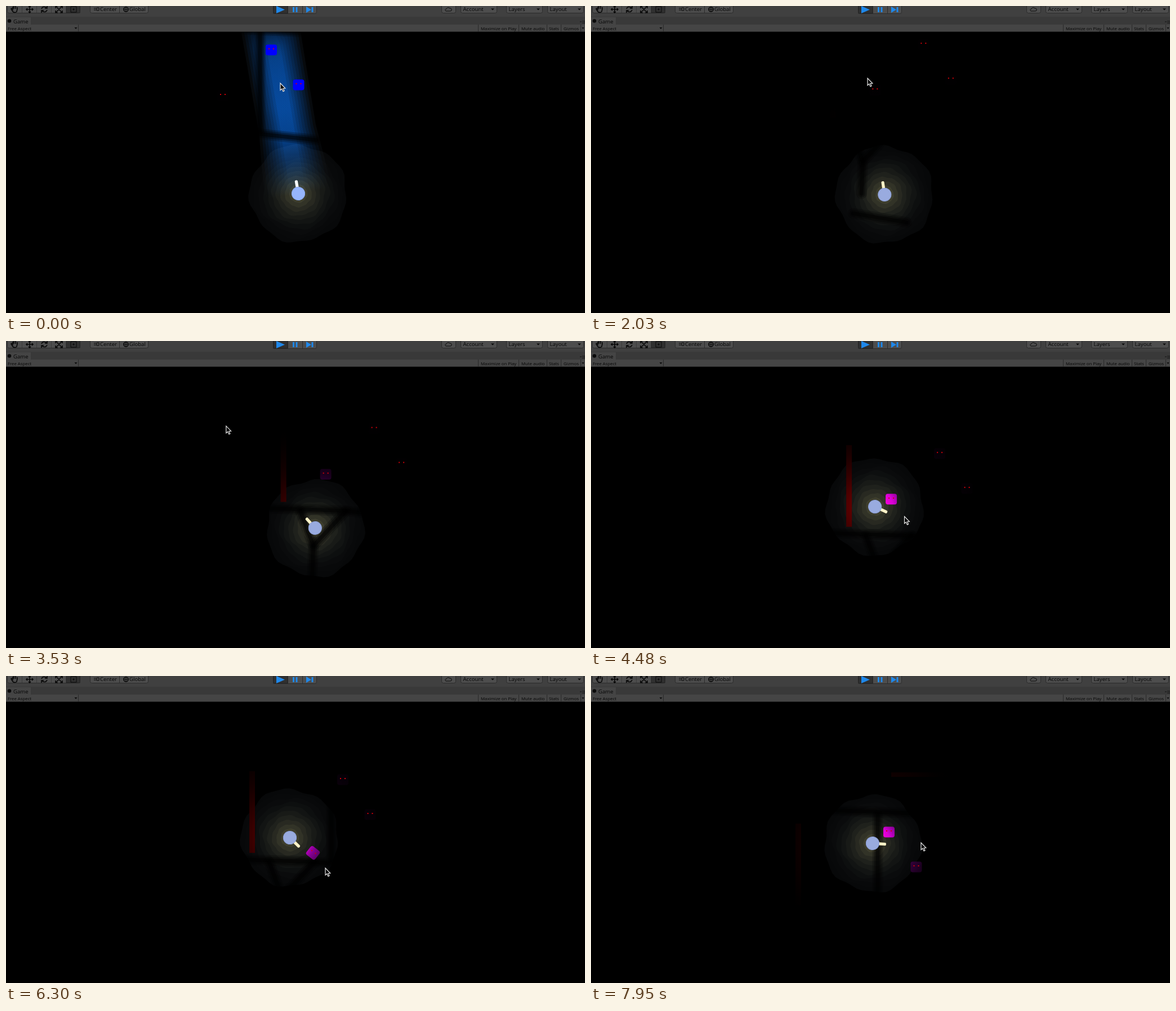
Animation, 1028 px wide and 545 px high, one loop 8 s. Source, as an HTML page with a canvas:

```html
<!DOCTYPE html>
<html lang="en">
<head>
<meta charset="utf-8">
<title>Flashlight game</title>
<style>
  html, body { margin: 0; width: 100%; height: 100%; overflow: hidden; background: #000; }
  canvas, svg { position: absolute; left: 0; top: 0; display: block; }
  text { font: 9.6px "Open Sans", "Noto Sans", sans-serif; fill: #060606; }
  .small text { font-size: 7.8px; }
  .btn { fill: #4d4d4d; stroke: #2b2b2b; }
  .on { fill: #303030; stroke: #222; }
  .ico { fill: none; stroke: #080808; stroke-width: 1.6; }
  .thin { stroke-width: 1; }
  .blue { fill: #1f88ea; }
</style>
</head>
<body>
<canvas id="stage" width="1028" height="545"></canvas>
<svg width="1028" height="46" viewBox="0 0 1028 46">
  <rect width="1028" height="46" fill="#404040"/>
  <rect y="19" width="1028" height="14" fill="#393939"/>
  <rect y="20" width="44" height="13" fill="#444"/>
  <rect y="33" width="1028" height="13" fill="#454545"/>
  <path d="M0 45.5H1028" stroke="#2a2a2a"/>
  <rect class="btn" x="2.5" y="-6.5" width="129" height="19" rx="3"/>
  <rect class="on" x="107" y="-6" width="24" height="18"/>
  <path d="M28.5 0V12M54.5 0V12M80.5 0V12M106.5 0V12" stroke="#3a3a3a"/>
  <g class="ico">
    <path d="M12 10L9 5Q10 3 12 6V1M14 5V0M17 5V0M20 6V2M12 10Q16 13 19 10L20 5"/>
    <path d="M36 6H48M42 0V12M38 4L36 6L38 8M46 4L48 6L46 8M40 2L42 0L44 2M40 10L42 12L44 10"/>
    <path d="M63 5Q65 0 70 2L73 4M73 0V4H69M73 7Q71 12 66 10L63 8M63 12V8H67"/>
    <path d="M89 1L99 11M99 1L89 11M88 4V0H92M96 0H100V4M100 8V12H96M92 12H88V8"/>
    <path class="thin" d="M115 1H125V11H115ZM119 5h2v2h-2z"/>
  </g>
  <rect class="btn" x="149.5" y="-6.5" width="103" height="19" rx="3"/>
  <path d="M201.5 0V12" stroke="#2b2b2b"/>
  <path d="M156 4h4M156 7h4M161 3h4v5h-4z" class="ico thin"/>
  <circle cx="213" cy="6" r="4" class="ico"/><path d="M209 6h8M213 2v8" class="ico thin"/>
  <text x="167" y="9">Center</text><text x="219" y="9">Global</text>

  <rect class="btn" x="474.5" y="-6.5" width="77" height="20" rx="3"/>
  <rect class="on" x="475" y="-6" width="25" height="19"/>
  <path d="M500.5 0V13M526.5 0V13" stroke="#2b2b2b"/>
  <path class="blue" d="M480 0L495 6.5L480 13ZM509 2h3v9h-3zM514.5 2h3v9h-3zM533 1L542 6.5L533 12ZM542.5 2h3v9h-3z"/>

  <g id="menus"></g>
  <path d="M781 9q-3-3 1-4q2-4 6-1q4 0 3 4q-1 1-3 1z" class="ico thin"/>
  <circle cx="6" cy="26.5" r="3.3" fill="#0a0a0a"/>
  <text x="13" y="30.5">Game</text>
  <path d="M1019 28h3M1023 27h5M1023 30h5" stroke="#111"/>
  <g class="small">
    <text x="3" y="42.5">Free Aspect</text><text x="843" y="42.5">Maximize on Play</text>
    <text x="915" y="42.5">Mute audio</text><text x="964" y="42.5">Stats</text><text x="990" y="42.5">Gizmos</text>
  </g>
  <path d="M128.5 33V46M838.5 33V46M910.5 33V46M960.5 33V46M985.5 33V46M1020.5 33V46" stroke="#292929"/>
  <path d="M121.5 38h5l-2.5 3zM1022.5 38h4l-2 3z" fill="#0a0a0a"/>
</svg>
<script>
const ctx = document.getElementById('stage').getContext('2d');
const LOOP = 8000, HOLD = 50, TAU = Math.PI * 2;
const { cos, sin, exp, min, max } = Math;

document.getElementById('menus').innerHTML =
  [[773, 25, ''], [807, 64, 'Account'], [888, 64, 'Layers'], [961, 64, 'Layout']].map(([x, w, label]) =>
    `<rect class="btn" x="${x + .5}" y="-6.5" width="${w}" height="19" rx="3"/>` +
    (label && `<text x="${x + 4.5}" y="9">${label}</text><path d="M${x + 54} 4.5h6l-3 3z" fill="#080808"/>`)).join('');

// Key poses: time, hero, mouse, world
const poses = [
  [0, 519, 333, 487, 137, 471, 78],
  [910, 542, 328, 416, 162, 536, 72],
  [2500, 515, 337, 514, 118, 607, 67],
  [2850, 518, 336, 361, 140, 591, 83],
  [3530, 549, 332, 391, 151, 654, 156],
  [4480, 504, 294, 557, 312, 619, 200],
  [6300, 504, 287, 567, 341, 598, 184],
  [7950, 500, 297, 586, 296, 529, 277]
];

// Ground cracks as polylines around the world point
const cracks = [
  [-200, 141, -50, 146, 80, 160],
  [-131, 146, -108, 208, -110, 265],
  [-108, 208, -50, 146],
  [-125, 300, -30, 316],
  [-20, -30, -20, 143],
  [-130, -40, 70, -32]
];

function poseAt(t) {
  const i = max(1, poses.findIndex(p => p[0] > t)), a = poses[i - 1], b = poses[i];
  const k = (t - a[0]) / (b[0] - a[0]), ease = k * k * (3 - 2 * k);
  return a.slice(1).map((v, j) => v + (b[j + 1] - v) * ease);
}

// The lamp flashes for 700 ms and dies away
function lampAt(t) {
  const p = [-250, 2030].map(on => (t - on) / 700).find(v => v >= 0 && v < 1);
  return p === undefined ? 0 : 1 - p ** 3;
}

function trace(pts, ox = 0, oy = 0) {
  ctx.beginPath();
  for (let i = 0; i < pts.length; i += 2) ctx.lineTo(pts[i] + ox, pts[i + 1] + oy);
}

function falloff(x, y, reach, colour) {
  const g = ctx.createRadialGradient(x, y, 0, x, y, reach);
  for (let i = 0; i <= 12; i++) g.addColorStop(i / 12, colour(reach * i / 12));
  return g;
}

function drawBeam(x, y, angle, level) {
  ctx.save();
  ctx.translate(x, y);
  ctx.rotate(angle);
  ctx.globalCompositeOperation = 'lighter';
  for (let i = 0; i < 9; i++) {
    const s = 1 - i * .095, far = 330 - i * 5;
    const rgb = (i ? [0, 8, 19] : [7, 10, 14]).map(v => v * level);
    const g = ctx.createLinearGradient(0, 0, far, 0);
    [0, .45, .9, 1, .95, .85, .2].forEach((a, k) => g.addColorStop(k / 6, `rgba(${rgb},${a})`));
    ctx.fillStyle = g;
    ctx.beginPath();
    for (const side of [-1, 1]) {
      const w = side * s, pts = [[0, 60 * w], [60, 56 * w], [115, 51 * w], [far - 25, 52 * w], [far, 30 * w]];
      (side < 0 ? pts : pts.reverse()).forEach(p => ctx.lineTo(...p));
    }
    ctx.fill();
  }
  ctx.restore();
}

function drawGlow(x, y, wx) {
  ctx.globalCompositeOperation = 'lighten';
  for (let i = 0; i < 10; i++) {
    const q = i / 9, r = 86 - 70 * q;
    ctx.fillStyle = `rgb(${7 + 55 * q ** 2},${8 + 54 * q ** 1.9},${9 + 36 * q ** 1.6})`;
    ctx.beginPath();
    for (let a = 0; a < TAU; a += .1) {
      const d = r * (1 + .025 * sin(5 * a + wx * .05 + i) + .018 * sin(11 * a + i * 2));
      ctx.lineTo(x + d * cos(a), y + d * sin(a));
    }
    ctx.fill();
  }
  ctx.globalCompositeOperation = 'source-over';
}

function drawCracks(x, y) {
  ctx.lineJoin = ctx.lineCap = 'round';
  for (const pts of cracks) {
    trace(pts, x, y);
    for (const [width, alpha] of [[19, .25], [13, .35], [7, .5]]) {
      ctx.lineWidth = width;
      ctx.strokeStyle = `rgba(0,0,0,${alpha})`;
      ctx.stroke();
    }
  }
}

function drawWalls(x, y, light) {
  ctx.fillStyle = light;
  ctx.fillRect(x - 166, y - 15, 10, 145);
  ctx.fillRect(x + 4, y - 106, 122, 8);
}

function drawMonster(x, y, turn, light, blue) {
  const box = new Path2D(), body = new Path2D();
  box.roundRect(-10, -9.5, 20, 19, 4);
  body.addPath(box, new DOMMatrix().translate(x, y).rotate(turn));
  ctx.fillStyle = blue ? `rgb(0,0,${255 * min(1, blue * 2)})` : light;
  ctx.fill(body);
  ctx.save();
  ctx.translate(x, y);
  ctx.rotate(turn * TAU / 360);
  ctx.fillStyle = '#d00008';
  ctx.fillRect(-5, -3, 2, 2);
  ctx.fillRect(3, -3, 2, 2);
  ctx.restore();
}

function drawHero(x, y, angle, lit) {
  ctx.save();
  ctx.translate(x, y);
  ctx.rotate(angle);
  ctx.fillStyle = lit ? '#fff' : '#fff3c8';
  ctx.beginPath();
  ctx.roundRect(10, -2.6, 14, 5.2, 2);
  ctx.fill();
  ctx.beginPath();
  ctx.arc(0, 0, 11.6, 0, TAU);
  ctx.fillStyle = lit ? '#96b5fc' : '#99abdf';
  ctx.fill();
  ctx.strokeStyle = lit ? '#8aa8ef' : '#8c9fd6';
  ctx.lineWidth = 1;
  ctx.stroke();
  ctx.restore();
}

function drawMouse(x, y) {
  trace([0, 0, 0, 12.5, 2.8, 10, 5, 14.6, 7, 13.7, 5, 9.3, 8.8, 9], x, y);
  ctx.closePath();
  ctx.lineJoin = 'miter';
  ctx.lineWidth = 1.2;
  ctx.fillStyle = '#000';
  ctx.strokeStyle = '#e8e8e8';
  ctx.fill();
  ctx.stroke();
}

function draw(t) {
  const [hx, hy, mx, my, wx, wy] = poseAt(t);
  const level = lampAt(t), angle = Math.atan2(my + 7 - hy, mx - hx);

  ctx.fillStyle = '#000';
  ctx.fillRect(0, 0, 1028, 545);
  drawGlow(hx, hy, wx);
  if (level) drawBeam(hx, hy, angle, level);
  drawCracks(wx, wy);
  drawWalls(wx, wy, falloff(hx, hy, 180, d => `rgb(${max(0, 210 * exp(-d / 60) - 11)},0,0)`));

  const light = falloff(hx, hy, 190, d => {
    const l = min(1, exp((27 - d) / 31));
    return `rgb(${255 * l},0,${min(215, 285 * l)})`;
  });
  // The nearest monster is knocked away, spinning
  const push = max(0, t - 5220) / 1080, slide = push ** 1.6;
  const monsters = [[0, 0, 0], [48.5, 62, 0], [33 * slide - 86, 49 * slide + 81, 38 * push]];
  for (const [dx, dy, turn] of monsters) {
    const x = wx + dx, y = wy + dy, rx = x - hx, ry = y - hy;
    const ahead = rx * cos(angle) + ry * sin(angle) > 0;
    const inBeam = ahead && Math.abs(ry * cos(angle) - rx * sin(angle)) < 50;
    drawMonster(x, y, turn, light, inBeam ? level : 0);
  }

  drawHero(hx, hy, angle, level > 0);
  drawMouse(mx, my);
}

const start = performance.now();
function frame(now) {
  const t = max(0, now - start) % LOOP;
  draw(min(t - t % HOLD, LOOP - HOLD - 1));
  requestAnimationFrame(frame);
}
frame(start);
</script>
</body>
</html>
```
